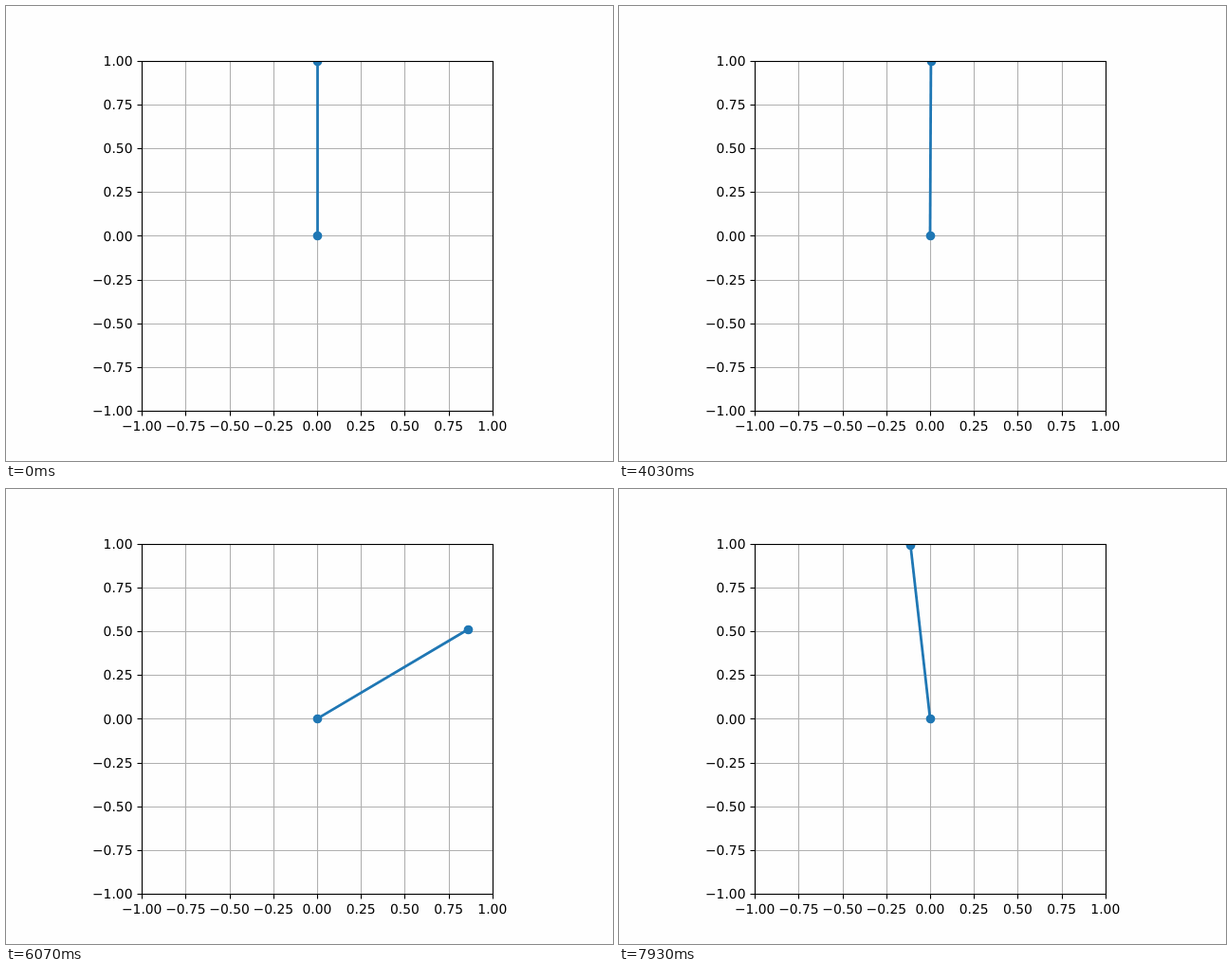
Recreate the animation shown at these times as an HTML page. Size 640x480 px, loop 7990 ms.

```html
<!DOCTYPE html>
<html lang="en">
<head>
<meta charset="utf-8">
<title>Pendulum</title>
<style>
  html, body { margin: 0; width: 100%; height: 100%; overflow: hidden; background: #fefefe; }
  svg { display: block; width: 640px; height: 480px; }
  text { font: 13.889px "DejaVu Sans", sans-serif; text-rendering: geometricPrecision; }
  line { stroke: #000; stroke-width: 1.111; }
  #grid line { stroke: #b0b0b0; }
  #rod { stroke: #1f77b4; stroke-width: 2.778; stroke-linecap: square; }
  circle { fill: #1f77b4; }
  rect.spine { fill: none; stroke: #000; stroke-width: 1.111; }
</style>
</head>
<body>
<svg viewBox="0 0 640 480">
  <clipPath id="axes"><rect x="143" y="58" width="370" height="370"/></clipPath>
  <g id="grid" clip-path="url(#axes)"></g>
  <g id="ticks"></g>
  <g clip-path="url(#axes)">
    <line id="rod"/>
    <circle id="pivot" r="4.86"/>
    <circle id="bob" r="4.86"/>
  </g>
  <rect class="spine" x="143.5" y="58.5" width="370" height="369"/>
</svg>
<script>
const LOOP = 7990, STEP = 60, OFFSET = 10;
const LENGTH = 184.8, CX = 328, CY = 242.4;
const BOTTOM_TIME = 6574;               // moment the bob passes its lowest point
const RATE = Math.sqrt(10) * 0.05 / STEP;
const STILL_UNTIL = 500;                // upright rod sits on whole pixels until here

const byId = id => document.getElementById(id);
const snap = v => Math.floor(v + 0.5) + 0.5;

function add(parent, tag, attrs, text = '') {
  const node = document.createElementNS('http://www.w3.org/2000/svg', tag);
  set(node, attrs);
  node.textContent = text;
  byId(parent).append(node);
}

function set(node, attrs) {
  for (const key in attrs) node.setAttribute(key, attrs[key]);
}

function buildAxes() {
  for (let i = -4; i <= 4; i++) {
    const value = i / 4;
    const label = (value < 0 ? '\u2212' : '') + Math.abs(value).toFixed(2);
    const px = CX + value * LENGTH, py = CY - value * LENGTH;
    const x = snap(px), y = snap(py);
    add('grid', 'line', { x1: x, x2: x, y1: 58, y2: 428 });
    add('grid', 'line', { x1: 143, x2: 513, y1: y, y2: y });
    add('ticks', 'line', { x1: x, x2: x, y1: 427.5, y2: 432.5 });
    add('ticks', 'line', { x1: 138.5, x2: 143.5, y1: y, y2: y });
    add('ticks', 'text', { x: px, y: 448, 'text-anchor': 'middle' }, label);
    add('ticks', 'text', { x: 133.5, y: Math.round(py + 5.2), 'text-anchor': 'end' }, label);
  }
}

// Pendulum falling from the upright balance: closed-form separatrix motion.
function angleAt(time) {
  return 4 * Math.atan(Math.exp(RATE * (time - BOTTOM_TIME)));
}

function draw() {
  const time = performance.now() % LOOP;
  const stepped = Math.floor((time - OFFSET) / STEP) * STEP + OFFSET;
  const angle = angleAt(stepped);
  const x = CX + LENGTH * Math.sin(angle);
  const y = CY - LENGTH * Math.cos(angle);
  const place = time < STILL_UNTIL ? snap : v => v;
  set(byId('rod'), { x1: place(CX), y1: place(CY), x2: place(x), y2: place(y) });
  set(byId('bob'), { cx: snap(x), cy: snap(y) });
}

function tick() {
  draw();
  requestAnimationFrame(tick);
}

buildAxes();
set(byId('pivot'), { cx: snap(CX), cy: snap(CY) });
tick();
</script>
</body>
</html>
```
